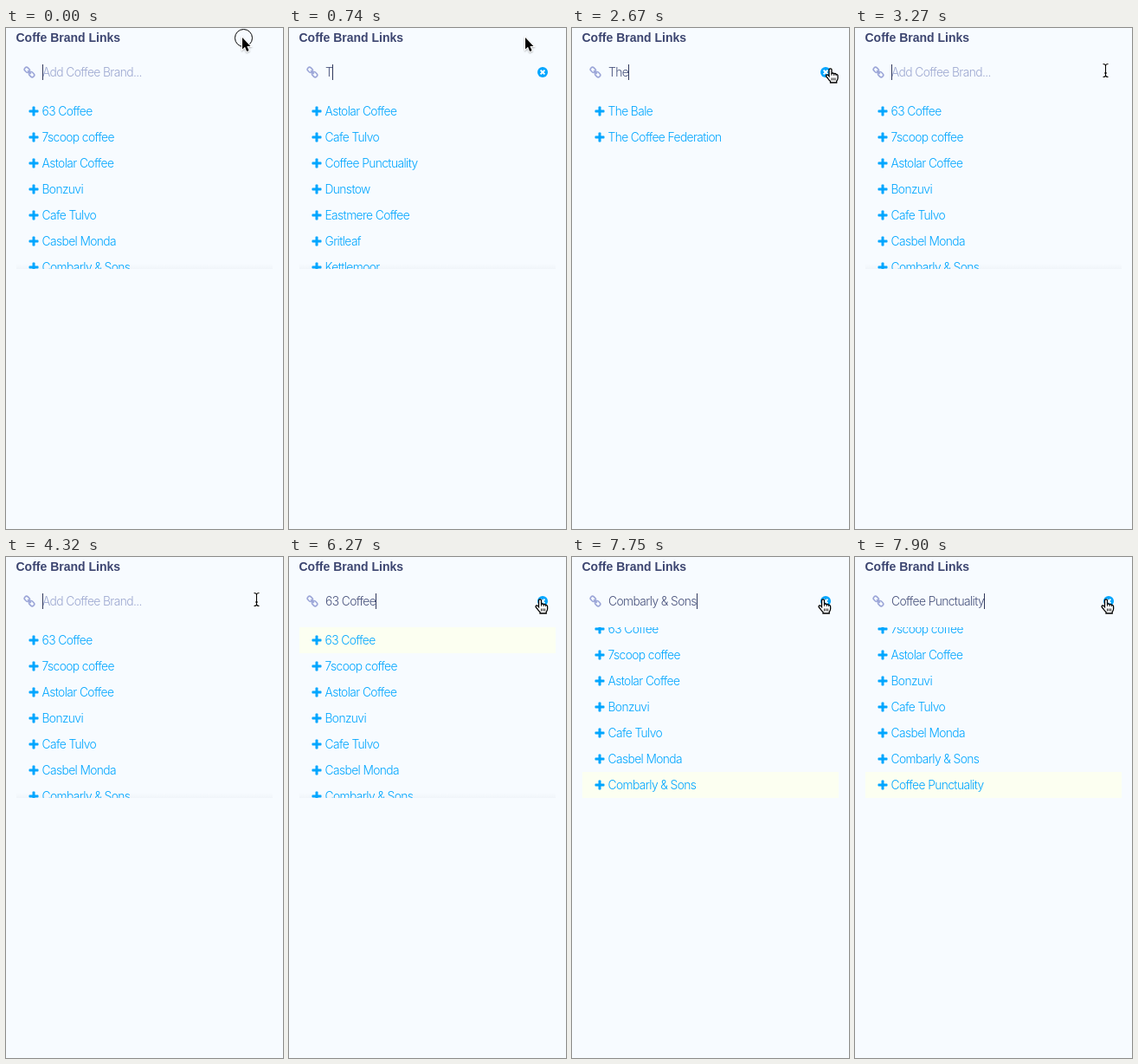
These frames come from a looping animation (320 px wide and 578 px high, 8 s). An HTML page with a canvas:

```html
<!DOCTYPE html>
<html lang="en">
<head>
<meta charset="utf-8">
<title>Coffe Brand Links</title>
<style>
html, body { margin: 0; width: 100%; height: 100%; overflow: hidden; background: #f7fbff; }
canvas { display: block; width: 320px; height: 578px; }
</style>
</head>
<body>
<canvas id="stage"></canvas>
<script>
const W = 320, H = 578, LOOP = 8000;
const ROW = 30, TOP = 81, BOTTOM = 278;
const BLUE = '#00a6ff', BG = '#f7fbff';
const LIGHT = '300 13.8px Inter, "Liberation Sans", sans-serif';
const BOLD = 'bold 14px "Liberation Sans", Arial, sans-serif';

const brands = [
  '63 Coffee', '7scoop coffee', 'Astolar Coffee', 'Bonzuvi', 'Cafe Tulvo',
  'Casbel Monda', 'Combarly & Sons', 'Coffee Punctuality', 'Dunstow',
  'Eastmere Coffee', 'Gritleaf', 'Kettlemoor', 'Norwick Roast',
  'The Bale', 'The Coffee Federation'
];

// [start, value]; each value holds until the next start
const typed = [[0, ''], [740, 'T'], [1190, 'Th'], [1340, 'The'], [3270, '']];
const picked = [[0, -1], [5220, 0], [6710, 1], [7010, 2], [7160, 3],
  [7310, 4], [7460, 5], [7750, 6], [7900, 7]];
const caretOn = [[0, true], [300, false], [740, true], [1940, false], [2390, true],
  [2970, false], [3270, true], [3720, false], [4320, true], [4770, false],
  [5220, true], [5820, false], [6270, true]];
const ring = [[0, [274.5, 11.5]], [150, null], [3120, [290.5, 47.5]], [3270, null]];
const pointer = [[0, [arrow, 273, 12]], [1940, [arrow, 275, 15]], [2090, [arrow, 281, 22]],
  [2240, [arrow, 290, 33]], [2390, [arrow, 299, 43]], [2530, [hand, 303, 48]],
  [2670, [hand, 298.5, 47]], [2820, [hand, 294, 48]], [2970, [hand, 290, 49]],
  [3270, [beam, 289.5, 49]], [5220, [hand, 290, 49]]];

const canvas = document.getElementById('stage');
const ctx = canvas.getContext('2d');
const dpr = window.devicePixelRatio || 1;
canvas.width = W * dpr;
canvas.height = H * dpr;

function at(track, t) {
  let value = track[0][1];
  for (const [start, v] of track) if (t >= start) value = v;
  return value;
}

function text(str, x, y, color, font = LIGHT, spacing = '-0.6px') {
  ctx.font = font;
  ctx.letterSpacing = spacing;
  ctx.fillStyle = color;
  ctx.fillText(str, x, y);
}

function plus(x, y) {
  ctx.fillStyle = BLUE;
  ctx.beginPath();
  ctx.roundRect(x - 5.5, y - 1.5, 11, 3, 0.7);
  ctx.roundRect(x - 1.5, y - 5.5, 3, 11, 0.7);
  ctx.fill();
}

function chain(x, y) {
  ctx.save();
  ctx.translate(x, y);
  ctx.rotate(Math.PI / 4);
  ctx.strokeStyle = '#9ca6d8';
  ctx.lineWidth = 1.6;
  for (const dx of [-7, 0.6]) {
    ctx.beginPath();
    ctx.roundRect(dx, -2.4, 6.4, 4.8, 2.2);
    ctx.stroke();
  }
  ctx.beginPath();
  ctx.moveTo(-2.6, 0);
  ctx.lineTo(2.6, 0);
  ctx.stroke();
  ctx.restore();
}

function clearButton(x, y) {
  ctx.fillStyle = BLUE;
  ctx.beginPath();
  ctx.arc(x, y, 6, 0, 7);
  ctx.fill();
  ctx.strokeStyle = '#fff';
  ctx.lineWidth = 2;
  ctx.beginPath();
  for (const s of [-1, 1]) {
    ctx.moveTo(x - 2.4, y - 2.4 * s);
    ctx.lineTo(x + 2.4, y + 2.4 * s);
  }
  ctx.stroke();
}

function arrow() {
  const p = new Path2D('M0 -1V12.5L3 9.8L5.2 15L7.6 14L5.4 9H9.4Z');
  ctx.shadowColor = 'rgba(0,0,0,.3)';
  ctx.shadowBlur = 2 * dpr;
  ctx.shadowOffsetY = dpr;
  ctx.strokeStyle = '#fff';
  ctx.lineWidth = 2;
  ctx.stroke(p);
  ctx.shadowColor = 'transparent';
  ctx.fillStyle = '#000';
  ctx.fill(p);
}

function hand() {
  const p = new Path2D('M-1.5 8.5V1.2Q-1.5 -.2 0 -.2T1.5 1.2V5.4Q3 4.4 4.2 5.8' +
    'Q5.7 5 6.6 6.5Q8.6 6.2 8.6 8.5V11Q8.4 13 7.2 14.2V16H0V14.5' +
    'Q-1.8 13 -3 11L-4.8 8.9Q-5.4 7.4 -4 6.9Q-2.7 6.9 -1.5 8.5Z');
  ctx.fillStyle = '#fff';
  ctx.fill(p);
  ctx.strokeStyle = '#000';
  ctx.lineWidth = 1.3;
  ctx.stroke(p);
  ctx.lineWidth = 0.9;
  ctx.stroke(new Path2D('M1.5 5.2V7.8M4.2 5.8V8M6.6 6.5V8.2M1.5 10.5V13.5M3.5 10.5V13.5M5.5 10.5V13.5'));
}

function beam() {
  const p = new Path2D('M-3 -7.5Q0 -7.5 0 -5.5Q0 -7.5 3 -7.5M0 -5.5V5.5M-3 7.5Q0 7.5 0 5.5Q0 7.5 3 7.5M-1.5 3H1.5');
  ctx.strokeStyle = '#fff';
  ctx.lineWidth = 2.4;
  ctx.stroke(p);
  ctx.strokeStyle = '#000';
  ctx.lineWidth = 1.1;
  ctx.stroke(p);
}

function drawList(query, active) {
  const rows = brands.filter(b => b.toLowerCase().includes(query.toLowerCase()));
  const scroll = Math.max(0, (active + 1) * ROW - (BOTTOM - TOP));
  ctx.save();
  ctx.beginPath();
  ctx.rect(12, TOP, 296, BOTTOM - TOP);
  ctx.clip();
  if (rows.length * ROW > BOTTOM - TOP) {
    const shade = ctx.createLinearGradient(0, BOTTOM - 6, 0, BOTTOM);
    shade.addColorStop(0, 'rgba(70,80,100,0)');
    shade.addColorStop(1, 'rgba(70,80,100,.035)');
    ctx.fillStyle = shade;
    ctx.fillRect(12, BOTTOM - 6, 296, 6);
  }
  rows.forEach((name, i) => {
    const y = TOP + i * ROW - scroll;
    if (i === active) {
      ctx.fillStyle = '#fcfff1';
      ctx.fillRect(12, y, 296, ROW);
    }
    plus(32, y + 15);
    text(name, 41.5, y + 20, BLUE);
  });
  ctx.restore();
}

function drawInput(value, showCaret) {
  chain(27, 51);
  if (value) {
    text(value, 42, 56, '#48527c');
    clearButton(293, 51);
  } else {
    text('Add Coffee Brand...', 42, 56, '#9ca7d0');
  }
  if (showCaret) {
    ctx.font = LIGHT;
    ctx.letterSpacing = '-0.6px';
    const x = 42 + Math.round(ctx.measureText(value).width);
    ctx.fillStyle = '#2f385c';
    ctx.fillRect(x, 42, 1, 18);
  }
}

function drawPointer([shape, x, y], click) {
  if (click) {
    ctx.strokeStyle = '#000';
    ctx.lineWidth = 1;
    ctx.beginPath();
    ctx.arc(click[0], click[1], 10, 0, 7);
    ctx.stroke();
  }
  ctx.save();
  ctx.translate(x, y);
  shape();
  ctx.restore();
}

function draw(t) {
  ctx.setTransform(dpr, 0, 0, dpr, 0, 0);
  ctx.fillStyle = BG;
  ctx.fillRect(0, 0, W, H);
  const query = at(typed, t), active = at(picked, t);
  text('Coffe Brand Links', 11.5, 16, '#3c4570', BOLD, '0px');
  drawInput(active < 0 ? query : brands[active], at(caretOn, t));
  drawList(query, active);
  drawPointer(at(pointer, t), at(ring, t));
}

const begin = performance.now();
function tick() {
  draw((performance.now() - begin) % LOOP);
  requestAnimationFrame(tick);
}
tick();
</script>
</body>
</html>
```
